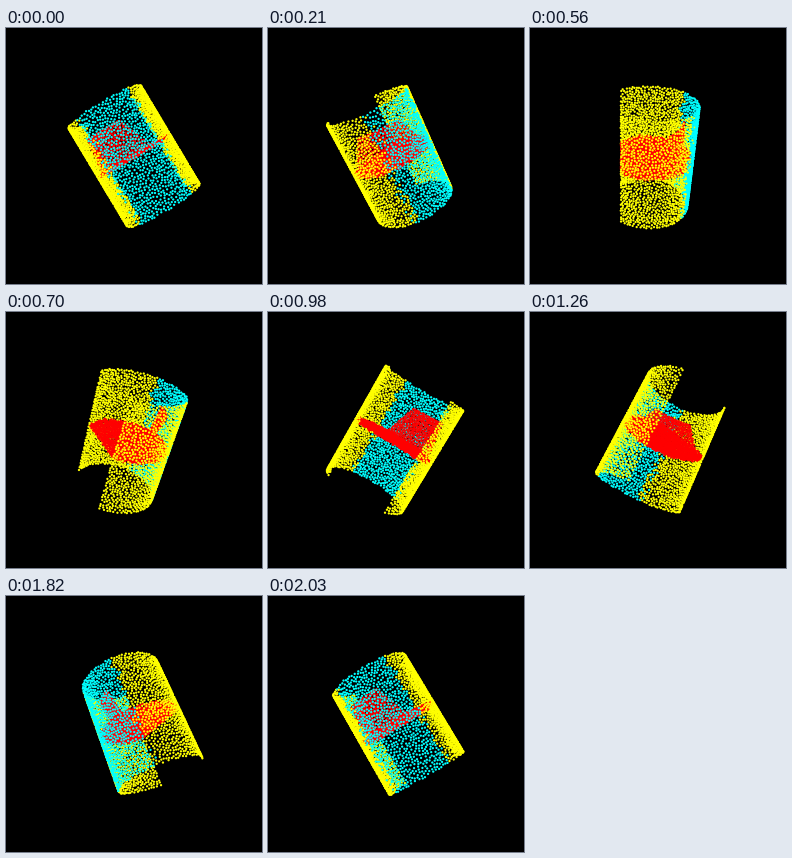
Write a matplotlib script that moves like this. It is 256 by 256 pixels and loops after 2.1 s.

```python
import numpy as np
import matplotlib.pyplot as plt
from matplotlib.animation import FuncAnimation

SIZE, DPI, FRAMES, INTERVAL = 256, 100, 30, 70
CAMERA = 345             # distance to the eye, in pixels at the stage plane
R, HALF = 42.8, 57.5     # trough radius and half length
BACK, RIM = 35, -37      # depth of the trough's back and of its open rim
MID = BACK - R
SWEEP = np.arccos((RIM - MID) / R)

rng = np.random.default_rng(4)


def darts(width, height, gap, tries):
    """Evenly spread random points, no two closer than gap."""
    pts = np.empty((tries, 2))
    n = 0
    for p in rng.random((tries, 2)) * (width, height):
        d = pts[:n] - p
        if n == 0 or (d * d).sum(axis=1).min() > gap * gap:
            pts[n] = p
            n += 1
    return pts[:n]


def place(t, s, z):
    """Trough coordinates (along, across, depth) to upright x, y, z."""
    ax_x, ax_y = 0.513, 0.858
    return np.column_stack([ax_x * t + ax_y * s, ax_y * t - ax_x * s, z])


def wall():
    arc, t = darts(2 * SWEEP * R, 2 * HALF, 2.15, 30000).T
    ang, t = arc / R - SWEEP, t - HALF
    pts = place(t, R * np.sin(ang), MID + R * np.cos(ang))
    middle = np.abs(ang) + rng.normal(0, 0.06, ang.size) < 0.7
    return pts, np.where(middle[:, None], (0, 1, 1), (1, 1, 0))


def plate():
    s, z = darts(2 * R, BACK - RIM, 1.3, 14000).T
    s, z = s - R, z + RIM
    inside = np.hypot(s, z - MID) < R - 1
    s, z = s[inside], z[inside]
    return place(rng.normal(0, 0.8, s.size), s, z)


def fin():
    u, v = darts(48, 38, 1.6, 6000).T / [[48], [38]]
    corners = np.array([(0, 19, 29), (0, -39, -22), (-36, 5, 24), (-37, -31, 4)])
    weights = np.array([(1 - u) * (1 - v), u * (1 - v), (1 - u) * v, u * v])
    t, s, z = corners.T @ weights
    bulge = 4 * np.sin(np.pi * u)
    return place(t, s - bulge * 0.5, z + bulge * 0.7)


shell, shell_rgb = wall()
red = np.vstack([plate(), fin()])
cloud = np.vstack([shell, red])
colors = np.vstack([shell_rgb, np.tile((1, 0, 0), (len(red), 1))])

fig = plt.figure(figsize=(SIZE / DPI, SIZE / DPI), dpi=DPI, facecolor="black")
ax = fig.add_axes([0, 0, 1, 1])
ax.set(xlim=(0, SIZE), ylim=(SIZE, 0))
ax.axis("off")
dots = ax.scatter(cloud[:, 0], cloud[:, 1], s=(2.3 * 72 / DPI) ** 2,
                  c=colors, linewidths=0)


def update(i):
    turn = 2 * np.pi * i / FRAMES
    x, y, z = cloud.T
    depth = z * np.cos(turn) - x * np.sin(turn)
    zoom = CAMERA / (CAMERA - depth)
    px = SIZE / 2 + zoom * (x * np.cos(turn) + z * np.sin(turn))
    py = SIZE / 2 + zoom * y
    order = np.argsort(depth)
    dots.set_offsets(np.column_stack([px, py])[order])
    dots.set_facecolors(colors[order])
    return (dots,)


anim = FuncAnimation(fig, update, frames=FRAMES, interval=INTERVAL, repeat=True)
plt.show()
```
